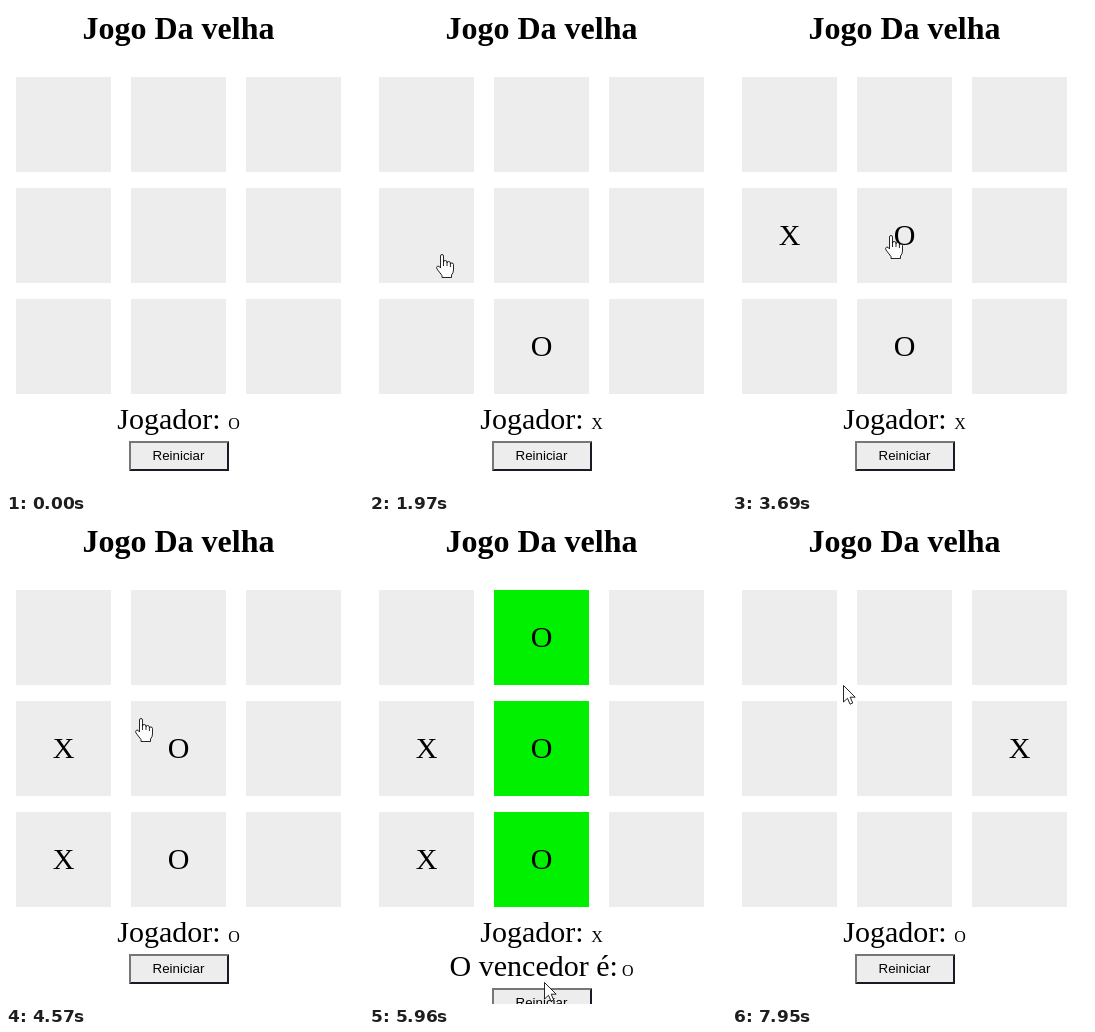
An HTML page that plays this animation: 357x485 px, repeating every 8000 ms.

```html
<!DOCTYPE html>
<html lang="pt">
<head>
<meta charset="utf-8">
<title>Jogo Da velha</title>
<style>
  html, body { margin: 0; width: 100%; height: 100%; overflow: hidden; background: #fff; }
  svg { display: block; width: 357px; height: 485px; }
  text { font: 30px "Liberation Serif", Times, serif; white-space: pre; }
  .title { font-size: 32px; font-weight: bold; }
  .mid { text-anchor: middle; }
  .small { font-size: 16px; }
  .label { font: 13.333px "Liberation Sans", Arial, sans-serif; }
  .cursor { fill: #fff; stroke: #000; stroke-width: .85; stroke-linejoin: round; }
</style>
</head>
<body>
<svg viewBox="0 0 357 485">
  <text class="title mid" x="172.5" y="33">Jogo Da velha</text>
  <g id="board"></g>
  <text x="111.3" y="423">Jogador:</text>
  <text class="small" id="turn" x="222.2" y="423"></text>
  <g id="result">
    <text x="80.6" y="457">O vencedor é:</text>
    <text class="small" id="winner" x="252.9" y="457"></text>
  </g>
  <g id="button">
    <rect id="face" x="124" y="436" width="98" height="28"/>
    <path fill="#767676" d="M123 465V435H223L221 437H125V463Z"/>
    <path fill="#1c1826" d="M223 435V465H123L125 463H221V437Z"/>
    <text class="label mid" x="172.5" y="454">Reiniciar</text>
  </g>
  <g id="pointer">
    <circle id="ring" cy=".5" r="12.3" fill="#ff0" fill-opacity=".5"/>
    <path class="cursor" id="arrow" d="M.5.5V17L4.5 13.3L7 19.2L9.7 18L7.2 12.2H12.2Z"/>
    <path class="cursor" id="hand" d="M-1.5 14V2Q-1.5.5 0 .5T1.5 2V8Q1.5 6.5 3.2 6.5T5 8V9Q5 7.5 6.6 7.5T8.4 9V10Q8.4 9 9.9 9T11.5 10.5V16Q11.5 19 9.5 21V23.5H0V21.5L-5 15Q-6 13-4.5 12.2T-1.5 14ZM1.5 8V12M5 9V12M8.4 10V13"/>
  </g>
</svg>
<script>
const LOOP = 8000, STEP = 70, SIZE = 95;

// Each stop: when the pointer travels there and, if it clicks, when that
// takes effect. The ring shows from down to up.
const stop = (from, to, x, y, hit = Infinity, down = hit - STEP, up = hit) =>
  ({ from, to, x, y, hit, down, up });
const START = { x: 276, y: 488 };
const STOPS = [
  stop(260, 890, 173, 351, 1350, 1220),
  stop(1550, 1970, 73, 248, 2300),
  stop(2500, 2920, 222, 177),
  stop(2990, 3280, 176, 209, 3480),
  stop(3610, 4100, 66, 335, 4500),
  stop(4500, 4570, 135, 199),
  stop(4640, 4980, 169, 121, 5120, 5050, 5190),
  stop(5260, 6030, 175, 470, 6630),
  stop(6760, 7040, 304, 228, 7460),
  stop(7530, 7950, 111, 166)
];

const $ = id => document.getElementById(id);
const show = (el, on) => el.setAttribute('visibility', on ? 'visible' : 'hidden');
const inside = (p, x, y, w, h) => p.x >= x && p.x < x + w && p.y >= y && p.y < y + h;

function add(tag, attrs) {
  const el = document.createElementNS('http://www.w3.org/2000/svg', tag);
  for (const key in attrs) el.setAttribute(key, attrs[key]);
  return $('board').appendChild(el);
}

const cells = Array.from({ length: 9 }, (_, i) => {
  const x = 10 + i % 3 * 115, y = 71 + Math.floor(i / 3) * 111;
  return {
    x, y,
    box: add('rect', { x, y, width: SIZE, height: SIZE }),
    sign: add('text', { x: x + SIZE / 2, y: y + 57, class: 'mid' })
  };
});
const cellAt = p => cells.findIndex(c => inside(p, c.x, c.y, SIZE, SIZE));

const line = (first, gap) => [first, first + gap, first + 2 * gap];
const LINES = [line(0, 4), line(2, 2)];
for (let i = 0; i < 3; i++) LINES.push(line(3 * i, 1), line(i, 3));

// Replay every click so far; one outside the cells restarts the game.
function gameAt(t) {
  let board = [], turn = 'O';
  for (const s of STOPS.filter(s => s.hit <= t)) {
    const i = cellAt(s);
    if (i < 0) {
      board = [];
    } else {
      board[i] = turn;
      turn = turn === 'O' ? 'X' : 'O';
    }
  }
  const win = LINES.find(([a, b, c]) => board[a] && board[a] === board[b] && board[a] === board[c]);
  return { board, turn, win };
}

const smooth = p => p * p * (3 - 2 * p);
const easeOut = p => 1 - (1 - p) ** 1.6;

function pointerAt(t) {
  let { x, y } = START;
  STOPS.filter(s => s.from <= t).forEach((s, i) => {
    const steps = Math.round((s.to - s.from) / STEP) + 1;
    const done = t >= s.to ? steps : Math.floor((t - s.from) / STEP) + 1;
    const e = (i ? smooth : easeOut)(Math.min(1, done / steps));
    x += (s.x - x) * e;
    y += (s.y - y) * e;
  });
  return { x: Math.round(x), y: Math.round(y) };
}

function draw(t) {
  const { board, turn, win } = gameAt(t);
  const tip = pointerAt(t);
  const shift = win ? 34 : 0;

  cells.forEach((cell, i) => {
    cell.sign.textContent = board[i] || '';
    cell.box.setAttribute('fill', win && win.includes(i) ? '#00f000' : '#ededed');
  });
  $('turn').textContent = turn;
  $('winner').textContent = win ? board[win[0]] : '';
  show($('result'), win);

  const hover = inside(tip, 123, 435 + shift, 100, 30);
  $('button').setAttribute('transform', `translate(0 ${shift})`);
  $('face').setAttribute('fill', hover ? '#e5e5e5' : '#ededed');

  const entered = t >= STOPS[0].from, overCell = cellAt(tip) >= 0;
  $('pointer').setAttribute('transform', `translate(${tip.x} ${tip.y})`);
  show($('hand'), entered && overCell);
  show($('arrow'), entered && !overCell);
  show($('ring'), STOPS.some(s => t >= s.down && t < s.up));
}

const begin = performance.now();
function tick() {
  draw((performance.now() - begin) % LOOP);
  requestAnimationFrame(tick);
}
tick();
</script>
</body>
</html>
```
